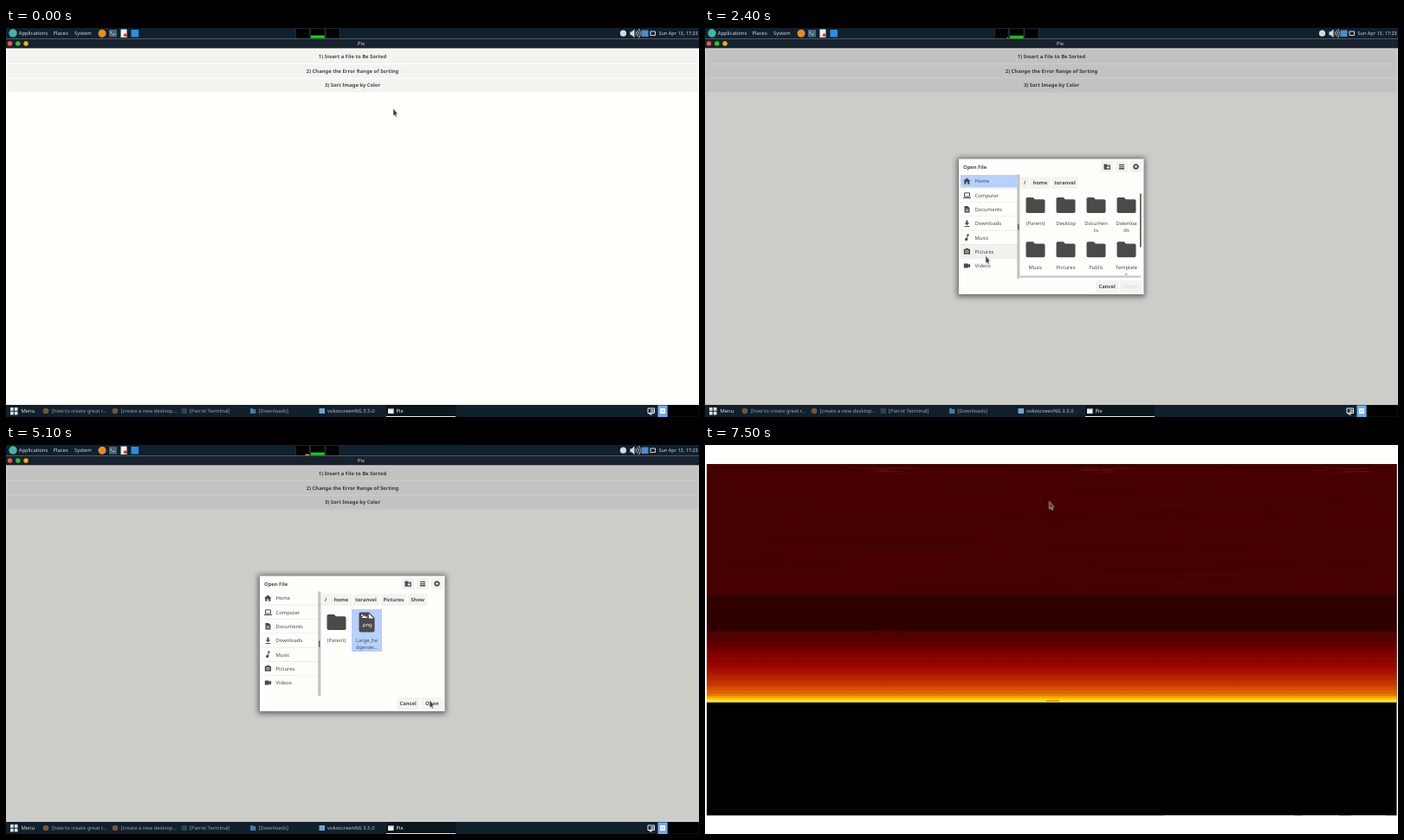
These frames come from a looping animation (800 px wide and 450 px high, 8.8 s). An HTML page:

```html
<!DOCTYPE html>
<html lang="en">
<head>
<meta charset="utf-8">
<title>Pix</title>
<style>
html, body { margin: 0; width: 100%; height: 100%; overflow: hidden; background: #fffffb; }
svg { display: block; }
text { font: 5.83px "Noto Sans", sans-serif; text-rendering: geometricPrecision; fill: #4a4a48; }
.b { font-weight: 700; }
.m { text-anchor: middle; }
.bar text { fill: #d3dade; }
.bar .dim { fill: #98a4ac; }
.btn { fill: #f3f3f0; }
.hover { fill: #e3e3e1; }
.ink { fill: #4a4a48; }

/* Percentages are ms / 88, rounded down. */
.t { animation: 8800ms step-end infinite; }
#hover1 { animation-name: hover1; }
#modal { animation-name: modal; }
#home { animation-name: home; }
#picsHover { animation-name: picsHover; }
#pics { animation-name: pics; }
#showHover { animation-name: showHover; }
#show { animation-name: show; }
#pngHover { animation-name: pngHover; }
.chosen { animation-name: chosen; }
#photo { animation-name: photo; }
#hover3 { animation-name: hover3; }
#sorted { animation-name: sorted; }
#load { animation-name: load; transform-origin: 350px 0; }
#mem { animation-name: mem; }
#cursor { animation-name: cursor; }
@keyframes hover1 { 0% { opacity: 0 } 5.68% { opacity: 1 } 10.22%, 100% { opacity: 0 } }
@keyframes modal { 0% { opacity: 0 } 10.22% { opacity: .6 } 11.36% { opacity: 1 } 61.36%, 100% { opacity: 0 } }
@keyframes home { 0% { opacity: 1 } 29.54%, 100% { opacity: 0 } }
@keyframes picsHover { 0% { opacity: 0 } 26.13% { opacity: 1 } 29.54%, 100% { opacity: 0 } }
@keyframes pics { 0% { opacity: 0 } 29.54% { opacity: 1 } 42.04%, 100% { opacity: 0 } }
@keyframes showHover { 0% { opacity: 0 } 38.63% { opacity: 1 } 42.04%, 100% { opacity: 0 } }
@keyframes show { 0% { opacity: 0 } 42.04%, 100% { opacity: 1 } }
@keyframes pngHover { 0% { opacity: 0 } 47.72% { opacity: 1 } 52.27%, 100% { opacity: 0 } }
@keyframes chosen { 0% { opacity: 0 } 52.27%, 100% { opacity: 1 } }
@keyframes photo { 0% { opacity: 0 } 61.36%, 100% { opacity: 1 } }
@keyframes hover3 { 0% { opacity: 0 } 71.59% { opacity: .6 } 76.13%, 100% { opacity: 1 } }
@keyframes sorted { 0% { opacity: 0 } 79.54%, 100% { opacity: 1 } }
@keyframes load { 0% { transform: scaleX(0) } 23.86% { transform: scaleX(.25) } 37.5% { transform: scaleX(.6) } 46.59%, 100% { transform: scaleX(1) } }
@keyframes mem { 0% { transform: none } 9.09% { transform: translateY(.6px) } 27.27% { transform: translateY(.3px) } 46.59%, 100% { transform: translateY(.1px) } }
@keyframes cursor {
  0% { transform: translate(447px, 93px) }
  1.13% { transform: translate(447px, 93px); animation-timing-function: steps(6, start) }
  7.95% { transform: translate(417px, 32.5px) }
  15.9% { transform: translate(417px, 32.5px); animation-timing-function: steps(9, start) }
  26.13% { transform: translate(331px, 255px); animation-timing-function: steps(2, start) }
  28.4% { transform: translate(324px, 263.5px) }
  31.81% { transform: translate(324px, 263.5px); animation-timing-function: steps(8, start) }
  40.9% { transform: translate(444px, 212.5px) }
  44.31% { transform: translate(444px, 212.5px); animation-timing-function: steps(6, start) }
  51.13% { transform: translate(418px, 212.5px) }
  52.27% { transform: translate(418px, 212.5px); animation-timing-function: steps(6, start) }
  59.09% { transform: translate(489px, 295px) }
  61.36% { transform: translate(489px, 283px) }
  62.5% { transform: translate(489px, 283px); animation-timing-function: steps(8, start) }
  71.59% { transform: translate(401px, 79px); animation-timing-function: steps(2, start) }
  73.86% { transform: translate(398px, 65.5px); opacity: 1 }
  79.54% { transform: translate(397.5px, 65.3px); opacity: 0 }
  85.22%, 100% { transform: translate(397.5px, 65.3px); opacity: 1 }
}
</style>
</head>
<body>
<svg width="800" height="450" viewBox="0 0 800 450">
  <defs>
    <symbol id="folder" overflow="visible"><path class="ink" d="M-11 -7.2q0-1.8 1.8-1.8h6.4l2.2 2.2h9.8q1.8 0 1.8 1.8v12.2q0 1.8-1.8 1.8h-18.4q-1.8 0-1.8-1.8z"/></symbol>
    <symbol id="png" overflow="visible">
      <path class="ink" d="M-9 -9q0-2 2-2h9.5l6.5 6.500v14.500q0 2-2 2h-14q-2 0-2-2z"/>
      <path fill="#fffefa" d="M2.300-9.500v5.500h5.500zM-6-4.500l3-3 2 2 1.500-1v2z"/>
      <circle cx="-5.500" cy="-7.500" r="1" fill="#fffefa"/>
      <text class="m" y="5" style="fill:#fffefa">.png</text>
    </symbol>
    <radialGradient id="sky" gradientUnits="userSpaceOnUse" cx="340" cy="225" r="340">
      <stop stop-color="#6c0000"/><stop offset=".45" stop-color="#4e0000"/><stop offset="1" stop-color="#2a0000"/>
    </radialGradient>
    <linearGradient id="fire" gradientUnits="userSpaceOnUse" x1="0" y1="236" x2="0" y2="138">
      <stop stop-color="#ffd21c"/><stop offset=".15" stop-color="#ff9108"/><stop offset=".4" stop-color="#e83c00"/>
      <stop offset=".75" stop-color="#bd1200"/><stop offset="1" stop-color="#800400"/>
    </linearGradient>
    <linearGradient id="bands" gradientUnits="userSpaceOnUse" x1="0" y1="215" x2="0" y2="297.500">
      <stop stop-color="#4c0000"/><stop offset=".22" stop-color="#620000"/><stop offset=".24" stop-color="#740000"/>
      <stop offset=".5" stop-color="#9c0600"/><stop offset=".62" stop-color="#b51c00"/><stop offset=".76" stop-color="#cc3c00"/>
      <stop offset=".87" stop-color="#e46c00"/><stop offset=".93" stop-color="#f8a600"/><stop offset=".97" stop-color="#ffe010"/><stop offset="1" stop-color="#fff030"/>
    </linearGradient>
    <filter id="soft" x="-30%" y="-30%" width="160%" height="160%"><feGaussianBlur stdDeviation="1.100"/></filter>
    <filter id="haze" x="-50%" y="-50%" width="200%" height="200%"><feGaussianBlur stdDeviation="9"/></filter>
    <filter id="shade" x="-10%" y="-10%" width="120%" height="120%"><feGaussianBlur stdDeviation="3"/></filter>
    <clipPath id="frame"><path d="M155 75.500h490v249.500h-490z"/></clipPath>
    <clipPath id="files"><path d="M364 188h138v98h-138z"/></clipPath>
  </defs>

  <path fill="#fffffb" d="M0 0h800v450H0z"/>
  <g id="buttons">
    <rect class="btn" x="1.500" y="25" width="797" height="16" rx="1"/>
    <rect class="btn" x="1.500" y="42" width="797" height="15.500" rx="1"/>
    <rect class="btn" x="1.500" y="58.700" width="797" height="15.500" rx="1"/>
    <rect id="hover1" class="hover t" x="1.500" y="25" width="797" height="16" rx="1"/>
    <rect id="hover3" class="hover t" x="1.500" y="58.700" width="797" height="15.500" rx="1"/>
    <text class="b m" x="400" y="35.100">1) Insert a File to Be Sorted</text>
    <text class="b m" x="400" y="51.700">2) Change the Error Range of Sorting</text>
    <text class="b m" x="400" y="68.300">3) Sort Image by Color</text>
  </g>

  <g id="photo" class="t" clip-path="url(#frame)">
    <path fill="url(#sky)" d="M155 75h490v250h-490z"/>
    <g filter="url(#haze)" fill="#a00800">
      <ellipse cx="352" cy="200" rx="55" ry="38" opacity=".75"/>
      <ellipse cx="412" cy="172" rx="55" ry="24" opacity=".65"/>
      <ellipse cx="507" cy="200" rx="25" ry="34" opacity=".7"/>
    </g>
    <g id="wisps" fill="none" stroke="url(#fire)" stroke-linecap="round" filter="url(#soft)"></g>
    <g fill="#b81800" filter="url(#soft)" opacity=".6">
      <ellipse cx="577" cy="240" rx="3" ry="5"/><ellipse cx="588" cy="246" rx="4" ry="3"/><ellipse cx="613" cy="246" rx="2" ry="6"/>
    </g>
    <circle cx="380" cy="1093" r="861" fill="none" stroke="#d03000" stroke-width="7" filter="url(#soft)"/>
    <circle cx="380" cy="1093" r="860.500" fill="#000" stroke="#ff9c00" stroke-width="3.600"/>
    <circle cx="380" cy="1093" r="859.600" fill="#000" stroke="#ffe020" stroke-width="1.600"/>
  </g>

  <g id="modal" class="t">
    <path d="M0 24h800v412H0z" opacity=".2"/>
    <path d="M291 150h217v161h-217z" opacity=".5" filter="url(#shade)"/>
    <path fill="#fffefa" d="M293 151.500h213.500v156.500h-213.500z"/>
    <text class="b" x="298" y="162.600">Open File</text>
    <g class="btn"><path d="M457 153.500h14v13.500h-14zM474 153.500h14v13.500h-14zM490.500 153.500h14v13.500h-14z"/></g>
    <path class="ink" d="M460.500 157.500h3l1 1h3.300v5.200h-7.300zM478 157.700h6v1.300h-6zM478 159.900h6v1.300h-6zM478 162.100h6v1.300h-6z"/>
    <path fill="#fffefa" d="M463.500 160.700h1.200v-1.200h1v1.200h1.200v1h-1.200v1.200h-1v-1.200h-1.200z"/>
    <circle cx="497.500" cy="160.400" r="2.100" fill="none" stroke="#4a4a48" stroke-width="1.600"/>
    <circle cx="497.500" cy="160.400" r="3.100" fill="none" stroke="#4a4a48" stroke-width="1" stroke-dasharray="1.200 1.235"/>

    <rect id="picsHover" class="t" x="295" y="250.500" width="65" height="16" fill="#f0f0ed"/>
    <g id="home" class="t">
      <path fill="#b5d1ff" d="M295 170h65v14.500h-65z"/>
      <g id="homeFiles" clip-path="url(#files)"></g>
      <path fill="#555" d="M502 191.500h1.600v62h-1.600z"/>
      <path fill="#c8c8c6" d="M364 286.500h139v2.300h-139z"/>
    </g>
    <g id="pics" class="t">
      <path fill="#b5d1ff" d="M295 250.500h65v16h-65z"/>
      <rect id="showHover" class="t" x="434.500" y="190" width="33" height="40" fill="#eeeeeb"/>
      <g id="picsFiles"></g>
    </g>
    <g id="show" class="t">
      <rect id="pngHover" class="t" x="399" y="190" width="35" height="49" fill="#eeeeeb"/>
      <rect class="t chosen" x="399" y="190" width="35" height="49" fill="#b5d1ff"/>
      <use href="#png" x="416.500" y="204.500"/>
      <g id="showFiles"></g>
    </g>
    <g id="path"></g>
    <g id="places"></g>
    <g class="ink">
      <path d="M298 177.300l4.300-3.800 4.300 3.800h-1.300v3.400h-2.100v-2.400h-1.800v2.400h-2.100v-3.400z"/>
      <path fill="none" stroke="#4a4a48" d="M299.500 190.800h6v4.200h-6zM298 196.500h9"/>
      <path d="M299.500 206h3.700l2.300 2.300v5.300h-6z"/>
      <path d="M301.400 222.500h2v3h1.800l-2.800 2.700-2.800-2.700h1.800zM299.600 229h5.600v1h-5.600z"/>
      <path d="M302.300 238.500h2.500v1.700h-1.500v4.300a1.700 1.500 0 1 1-1-1.300z"/>
      <path d="M298.800 255.700h1.800l.8-1h2l.8 1h1.800v6h-7.200z"/>
      <path d="M298.800 272.500h5v1.500l2.300-1.500v5l-2.300-1.500v1.500h-5z"/>
    </g>
    <circle cx="302.400" cy="258.700" r="1.500" fill="none" stroke="#fffefa" stroke-width=".8"/>
    <path fill="#fffefa" d="M300.800 209.500h3.400v.8h-3.400zM300.800 211.300h3.400v.8h-3.400z"/>
    <path fill="#c3c3c0" d="M360.200 169.500h3.200v120.500h-3.200z"/>
    <path fill="#333" d="M361.300 226.500h1v7h-1z"/>

    <path class="btn" d="M451 292h26.500v14h-26.500zM479 292h25.500v14h-25.500z"/>
    <text class="b m" x="464.200" y="301.200">Cancel</text>
    <text class="b m" x="491.700" y="301.200" style="fill:#dfdfdc">Open</text>
    <text class="b m t chosen" x="491.700" y="301.200">Open</text>
  </g>

  <g class="bar">
    <path fill="#10202e" d="M0 0h800v12.500H0z"/>
    <path fill="#17222e" d="M0 12.500h800v11H0z"/>
    <path fill="#8e979c" d="M0 23.200h800v.8H0z"/>
    <circle cx="4.500" cy="18" r="2.700" fill="#ee5a3a"/>
    <circle cx="13.800" cy="18" r="2.700" fill="#2fc22f"/>
    <circle cx="23" cy="18" r="2.700" fill="#eeb400"/>
    <text class="m" x="410" y="20.300">Pix</text>
    <circle cx="8" cy="6" r="4.700" fill="#45b5a5"/>
    <text x="14.700" y="8.200">Applications</text>
    <text x="54.500" y="8.200">Places</text>
    <text x="79" y="8.200">System</text>
    <circle cx="111" cy="6.200" r="4.500" fill="#e88a25"/>
    <path fill="#48677a" d="M119 2h9v8.500h-9z"/>
    <path fill="none" stroke="#d8e4ea" stroke-width=".8" d="M120.500 4l1.500 1.300-1.500 1.300M123 7.500h2.500"/>
    <path fill="#f2f2f0" d="M132.500 1.500h7v9.500h-7z"/>
    <circle cx="137.800" cy="8.300" r="2" fill="#e03a2a"/>
    <path fill="#2c8ee0" d="M144.500 2h8.500v8.500h-8.500z"/>
    <path stroke="#33414c" stroke-width=".6" d="M334.500 .3h15.700v11.700h-15.700zM351.500 .3h16.500v11.700h-16.500zM369 .3h16v11.700h-16z"/>
    <path id="mem" class="t" fill="#18d818" d="M352 8.600h15.700v3.100h-15.700z"/>
    <path id="load" class="t" fill="#c9b52a" d="M345.500 10.700h4.500v1.300h-4.500z"/>
    <circle cx="712.500" cy="6.200" r="3.600" fill="#d3dade"/>
    <path fill="#d3dade" d="M720.500 4.200h2l3-3v10l-3-3h-2z"/>
    <path fill="none" stroke="#d3dade" stroke-width=".9" d="M727 4q1.500 2.200 0 4.400M728.800 2.500q2.600 3.700 0 7.400M730.500 1q3.500 5.200 0 10.400"/>
    <path fill="#4d8dc8" d="M733.500 2.500h8v7.500h-8z"/>
    <path fill="none" stroke="#d3dade" d="M744 4h5.500v4.500h-5.500z"/>
    <text x="753.500" y="8.200" style="font-size:5.530px">Sun Apr 13, 17:23</text>

    <path fill="#10202c" d="M0 436h800v14H0z"/>
    <path fill="#0a151e" d="M439 436h80v14h-80z"/>
    <path fill="#dfe6ea" d="M439 449h80v1h-80zM5 439h3.700v3.700h-3.700zM9.800 439h3.700v3.700h-3.700zM5 443.700h3.700v3.700h-3.700zM9.800 443.700h3.700v3.700h-3.700z"/>
    <text x="17.500" y="445">Menu</text>
    <circle cx="46" cy="443" r="3.300" fill="#775535"/>
    <text class="dim" x="53" y="445">[how to create great r...</text>
    <circle cx="126" cy="443" r="3.300" fill="#775535"/>
    <text class="dim" x="132.500" y="445">[create a new desktop...</text>
    <path fill="#2e4250" d="M202.500 440h6.500v6h-6.500z"/>
    <text class="dim" x="212" y="445">[Parrot Terminal]</text>
    <path fill="#4b7ba0" d="M282 440h2.500l.8 1h3v5h-6.300z"/>
    <text class="dim" x="291.500" y="445">[Downloads]</text>
    <path fill="#6ea5d4" d="M361.500 440h6.500v6h-6.500z"/>
    <text x="371" y="445" style="fill:#b9c4ca">vokoscreenNG 3.5.0</text>
    <path fill="#f4f4ee" d="M441 440h6.500v6h-6.500z"/><path fill="#8e9aa0" d="M441 440h6.500v1.300h-6.500z"/>
    <text x="450.500" y="445" style="fill:#fff">Pix</text>
    <path fill="none" stroke="#f0f4f6" d="M741 440h7.500v5.500h-7.500zM743 445.500v1.500h3M744 442h3v2h-3"/>
    <path fill="#72aee8" d="M752.500 436.500h11v13.500h-11z"/><path fill="#f4f8fa" d="M755 440h6v6h-6z"/><path fill="#72aee8" d="M756 442.500h4v1h-4z"/>
    <path d="M764.500 436.500h35v13h-35z"/>
  </g>

  <g id="sorted" class="t">
    <path fill="#fffffb" d="M0 0h800v450H0z"/>
    <path d="M2 22h796.500v406.500h-796.500z"/>
    <path fill="#450000" d="M2 22h796.500v152h-796.500z"/>
    <path fill="#2f0000" d="M2 173.500h796.500v42h-796.500z"/>
    <path fill="url(#bands)" d="M2 215.300h796.500v82.500h-796.500z"/>
    <g id="streaks"></g>
    <path fill="#e07800" d="M394 295.300h15v1.300h-15z"/>
    <path fill="#600000" d="M188 214.800h40v.8h-40z"/>
    <path fill="#d8c840" d="M530 428h150v.8h-150zM690 428h42v.8h-42zM746 428h40v.8h-40z"/>
  </g>

  <path id="cursor" class="t" fill="#3c3c3c" stroke="#d8d8d8" stroke-width=".7" stroke-linejoin="round" d="M0 0v8.700l1.700-1.300 1.300 2.500 1.300-.7-1.200-2.500 2.100-.5z"/>
</svg>
<script>
const $ = id => document.getElementById(id);
const add = (id, markup) => $(id).insertAdjacentHTML("beforeend", markup);

let seed = 11;
const rnd = (a = 0, b = 1) => {
  seed = (seed * 16807) % 2147483647;
  return a + (b - a) * seed / 2147483647;
};

// Files: a name may break over two lines with "|".
const label = (name, x, y) => name.split("|")
  .map((s, i) => `<text class="m" x="${x}" y="${y + i * 8.3}">${s}</text>`).join("");
const listFiles = (id, names) => names.forEach((name, i) => {
  const x = 381.500 + i % 4 * 35, y = 205 + (i >> 2) * 51.3;
  const icon = name.startsWith("Large") ? "" : `<use href="#folder" x="${x}" y="${y}"/>`;
  add(id, icon + label(name, x, y + 22.5));
});
listFiles("homeFiles", ["(Parent)", "Desktop", "Documen|ts", "Downloa|ds", "Music", "Pictures", "Public", "Template|s"]);
listFiles("picsFiles", ["(Parent)", "Screens|hots", "Show"]);
listFiles("showFiles", ["(Parent)", "Large_he|dgerow..."]);

const crumb = (id, name, x, w) => add(id,
  `<rect class="btn" x="${x}" y="172" width="${w}" height="14"/>
   <text class="b m" x="${x + w / 2}" y="181.300">${name}</text>`);
crumb("path", "/", 364.5, 9.5);
crumb("path", "home", 375, 24);
crumb("path", "toranvel", 400.5, 30);
for (const id of ["pics", "show"]) crumb(id, "Pictures", 432, 30.5);
crumb("show", "Show", 464, 22.5);

["Home", "Computer", "Documents", "Downloads", "Music", "Pictures", "Videos"].forEach((name, i) => {
  const y = 177 + i * 16.33;
  add("places", `<text x="311.500" y="${y + 2.2}">${name}</text>` +
    (i < 6 ? `<path fill="#e6e6e3" d="M295 ${y + 7.8}h65v.6h-65z"/>` : ""));
});

// Soft flames rising from the limb between x0 and x1.
const limb = x => 233 + (x - 380) ** 2 / 1720;
const flames = (n, x0, x1, low, high, lift = 0) => {
  for (let i = 0; i < n; i++) {
    const x = rnd(x0, x1), y = limb(x) - rnd(0, lift);
    const h = rnd(low, high), a = rnd(-9, 9), lean = rnd(-5, 9);
    add("wisps", `<path opacity="${rnd(.25, .7).toFixed(2)}" stroke-width="${rnd(1, 3.6).toFixed(1)}"
      d="M${x} ${y}c${a} ${-h * .35} ${lean - a} ${-h * .65} ${lean} ${-h}"/>`);
  }
};
flames(46, 292, 345, 20, 58);
flames(40, 335, 400, 35, 88);
flames(22, 345, 400, 20, 38, 55);
flames(24, 395, 460, 12, 30, 58);
flames(12, 440, 500, 8, 18, 62);
flames(32, 486, 530, 20, 45, 28);
flames(6, 500, 520, 20, 50);

// Fine horizontal grain of the sorted pixels.
for (let i = 0; i < 130; i++) {
  const y = rnd(23, 172), x = rnd(2, 500), w = rnd(80, 796 - x);
  add("streaks", `<path fill="${rnd() < .5 ? "#560000" : "#360000"}" opacity="${rnd(.2, .6).toFixed(2)}" d="M${x} ${y}h${w}v.8h${-w}z"/>`);
}
for (let y = 222; y < 292; y += rnd(2, 7))
  add("streaks", `<path opacity="${rnd(.05, .16).toFixed(2)}" d="M2 ${y}h796.500v1.200h-796.500z"/>`);
for (const x of [165, 420, 700])
  for (let i = 0; i < 8; i++)
    add("streaks", `<path fill="#84402c" opacity=".45" d="M${x + rnd(0, 40)} ${rnd(26, 33)}h${rnd(10, 45)}v.5h-10z"/>`);
</script>
</body>
</html>
```
